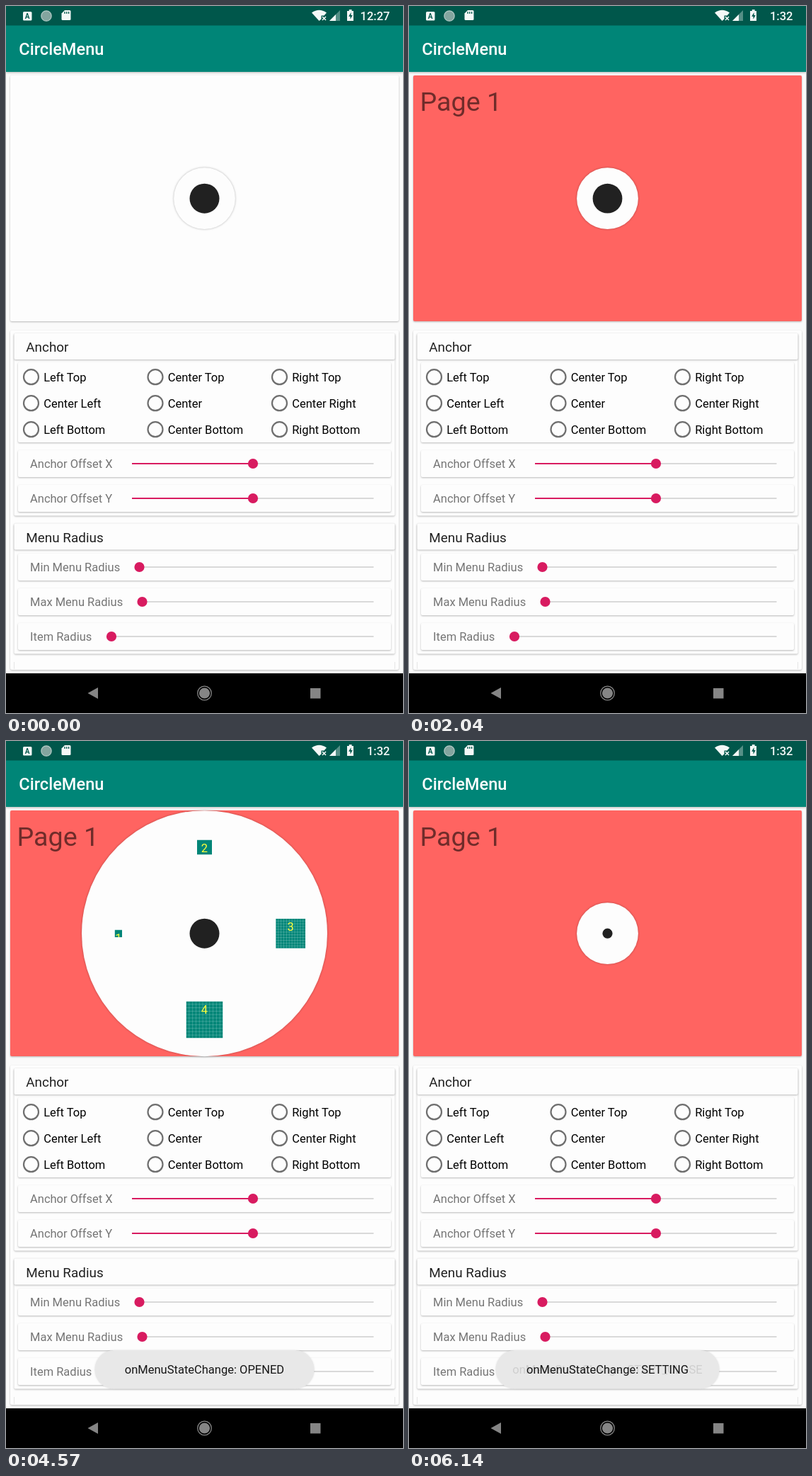
These frames come from a looping animation (561x998 px, 6.18 s). An HTML page:

```html
<!DOCTYPE html>
<html lang="en">
<head>
<meta charset="utf-8">
<title>CircleMenu</title>
<style>
html, body { margin: 0; width: 100%; height: 100%; overflow: hidden; background: #fafafa; }
svg { display: block; }
#stage { width: 100vw; height: 100vh; font-family: Roboto, "Open Sans", sans-serif; font-size: 16.5px; }
.card { fill: #fdfdfd; filter: drop-shadow(0 1.6px 1.2px rgba(0,0,0,.27)); }
.head { font-size: 18.9px; fill: #212121; }
.label { fill: #757575; }
.mid { text-anchor: middle; }
#disc { fill: #fdfdfd; filter: drop-shadow(0 .6px 1.8px rgba(0,0,0,.3)); }
#pill { fill: #e8e8e8; filter: drop-shadow(0 .5px 1px rgba(0,0,0,.12)); }
</style>
</head>
<body>
<svg id="stage" viewBox="0 0 561 998">
  <rect width="561" height="998" fill="#fafafa"/>
  <rect width="561" height="93" fill="#008577" style="filter:drop-shadow(0 1.5px 1.5px rgba(0,0,0,.28))"/>
  <rect width="561" height="27.5" fill="#00574b"/>
  <text x="18.3" y="69" font-size="23.6" font-weight="500" fill="#fff">CircleMenu</text>

  <g id="status" fill="#f4f8f7">
    <rect x="24" y="8" width="12.5" height="12.5" rx="1.5"/>
    <text class="mid" x="30.2" y="17.8" font-size="10" font-weight="700" fill="#00574b">A</text>
    <circle cx="57" cy="14" r="7.2" fill="#84a59f" stroke="#b5cbc7" stroke-width="1.2"/>
    <path d="M83 6h7q1.5 0 1.5 1.5v11q0 1.500-1.500 1.500h-10q-1.500 0-1.500-1.500v-8z"/>
    <path d="M83 8v3M85.800 8v3M88.600 8v3" stroke="#00574b" stroke-width="1.300"/>
    <path d="M432 9.500q10.500-7.500 21 0l-3.500 4h-4v5l-3 2.500z"/>
    <path d="M447 15l5 5m0-5l-5 5" stroke="#f4f8f7" stroke-width="1.600"/>
    <path d="M472 6v15h-15z" opacity=".35"/>
    <path d="M466 12v9h-9z"/>
    <path d="M484.800 5h3.800v2h2.400v14h-9v-14h2.800z"/>
    <path d="M487.500 9l-3.300 5.800h2.300v4l3.200-5.800h-2.200z" fill="#00574b"/>
    <text id="clock" x="542.500" y="19.800" font-weight="500" text-anchor="end"></text>
  </g>

  <rect id="page" class="card" x="6" y="98" width="549" height="347" rx="2"/>
  <text id="title" x="15.400" y="147.500" font-size="37.700" fill="#000" fill-opacity=".56">Page 1</text>
  <circle id="disc" cx="280.500" cy="271.700"/>
  <g id="items"></g>
  <circle id="icon" cx="280.500" cy="271.700" fill="#212121"/>

  <g id="panel"></g>

  <g id="toast">
    <rect id="pill" y="860" height="54.500" rx="27.200"/>
    <text id="prev" class="mid" x="280.500" y="893"></text>
    <text id="cur" class="mid" x="280.500" y="893"></text>
  </g>

  <rect y="942" width="561" height="56"/>
  <g fill="#858585">
    <path d="M115.500 970l14.500-8v16z"/>
    <circle cx="280.500" cy="970" r="7.600"/>
    <circle cx="280.500" cy="970" r="9.800" fill="none" stroke="#858585" stroke-width="1.300"/>
    <rect x="430" y="963" width="14.500" height="14.500"/>
  </g>
</svg>
<script>
const LOOP = 6180, CX = 280.5, CY = 271.7, STEP = 230, REACH = 121.7;
const $ = id => document.getElementById(id);
const set = (el, attrs) => { for (const k in attrs) el.setAttribute(k, attrs[k]); };
const ramp = (t, a, b) => Math.min(1, Math.max(0, (t - a) / (b - a)));
const smooth = p => (1 - Math.cos(Math.PI * p)) / 2;
const decel = p => 1 - (1 - p) ** 2;

// Settings panel
const card = (x, y, bottom) =>
  `<rect class="card" x="${x}" y="${y}" width="${561 - 2 * x}" height="${bottom - y}" rx="2"/>`;
const text = (cls, x, y, s) => `<text class="${cls}" x="${x}" y="${y}">${s}</text>`;
const group = (name, y, bottom) =>
  card(11.5, y, bottom) + card(11.5, y, y + 37) + text('head', 28.3, y + 26, name);

function slider(name, y, start, thumb) {
  return card(17, y - 19, y + 19) + text('label', 34, y + 6.3, name) +
    `<path d="M${start} ${y}H519.500" stroke="#d9d9d9" stroke-width="2"/>
     <path d="M${start} ${y}H${thumb}" stroke="#d81b60" stroke-width="2"/>
     <circle cx="${thumb}" cy="${y}" r="7.100" fill="#d81b60"/>`;
}

const radios = [
  ['Left Top', 'Center Top', 'Right Top'],
  ['Center Left', 'Center', 'Center Right'],
  ['Left Bottom', 'Center Bottom', 'Right Bottom']
].map((row, j) => row.map((name, i) => {
  const x = 35.5 + 175.5 * i, y = 523.7 + 37 * j;
  return `<circle cx="${x}" cy="${y}" r="10.500" fill="none" stroke="#6f6f6f" stroke-width="2.200"/>` +
    text('', x + 17.7, y + 6, name);
}).join('')).join('');

$('panel').innerHTML =
  card(6, 458, 937) +
  group('Anchor', 462, 719.5) + card(17, 503, 616) + radios +
  slider('Anchor Offset X', 646, 178, 349) +
  slider('Anchor Offset Y', 695, 178, 349) +
  group('Menu Radius', 730.5, 914.5) +
  slider('Min Menu Radius', 792, 188.5, 188.5) +
  slider('Max Menu Radius', 841, 192.5, 192.5) +
  slider('Item Radius', 890, 149, 149) +
  '<path d="M11.500 926v10M549.500 926v10" stroke="#e6e6e6"/>';

// Menu items: left, top, right, bottom
const items = [10.5, 21, 42, 52].map((size, i) => {
  let grid = '';
  if (size > 30) for (let k = 0; k < 10; k++) {
    const p = (9 + 10 * k) / 108 * size;
    grid += `M${p} 0V${size}M0 ${p}H${size}`;
  }
  const el = document.createElementNS('http://www.w3.org/2000/svg', 'svg');
  set(el, { width: size, height: size, overflow: 'hidden' });
  el.innerHTML = `<rect width="${size}" height="${size}" fill="#008577"/>
    <path d="${grid}" stroke="#fff" stroke-opacity=".4" stroke-width=".5"/>
    <text class="mid" x="${size / 2}" y="17.500" fill="#ffff3c">${i + 1}</text>`;
  $('items').append(el);
  const angle = Math.PI * (1 + i / 2);
  return { el, size, dx: Math.cos(angle) * REACH, dy: Math.sin(angle) * REACH };
});

// Toast messages: time, state, fade length, remainder of the previous one
const toasts = [
  [2060, 'START_OPEN', 120, 0],
  [2260, 'SETTING', 140, .13],
  [3900, 'OPENED', 300, 0],
  [4600, 'START_CLOSE', 150, 0],
  [4880, 'SETTING', 150, .11]
];

function drawToast(t) {
  const n = toasts.findLastIndex(m => t >= m[0]);
  $('toast').style.display = n < 0 ? 'none' : '';
  if (n < 0) return;
  const [at, state, fade, rest] = toasts[n], p = ramp(t, at, at + fade);
  const message = s => 'onMenuStateChange: ' + s;
  const left = t < 4600 ? 125.5 : 122.5;
  set($('pill'), { x: left, width: 2 * (CX - left), opacity: n ? 1 : p });
  $('cur').textContent = message(state);
  $('prev').textContent = n ? message(toasts[n - 1][1]) : '';
  const left_over = n === 1 ? rest * (1 - ramp(t, 3500, 3860)) : rest;
  set($('cur'), { 'fill-opacity': .9 * p });
  set($('prev'), { 'fill-opacity': Math.max(.9 * (1 - p), left_over) });
}

function draw(t) {
  const first = t < 70;
  $('clock').textContent = first ? '12:27' : '1:32';
  $('title').style.display = first ? 'none' : '';
  $('page').style.fill = first ? '#fdfdfd' : '#ff6461';

  const open = smooth(ramp(t, 2080, 2400)) - smooth(ramp(t, 5680, 6000));
  set($('disc'), { r: 43.4 + 130.1 * open });
  const scale = 1 - ramp(t, 2040, 2240) + ramp(t, 2240, 2420)
    - ramp(t, 5860, 6060) + ramp(t, 6060, 6300);
  set($('icon'), { r: 21 * scale });

  items.forEach(({ el, size, dx, dy }, i) => {
    const out = 2680 + STEP * i, back = 4650 + STEP * i;
    const p = decel(ramp(t, out, out + STEP)) - decel(ramp(t, back, back + STEP));
    el.style.display = p > 0 ? '' : 'none';
    set(el, { x: CX + dx * p - size / 2, y: CY + dy * p - size / 2 });
  });
  drawToast(t);
}

function tick() {
  draw(performance.now() % LOOP);
  requestAnimationFrame(tick);
}
tick();
</script>
</body>
</html>
```
